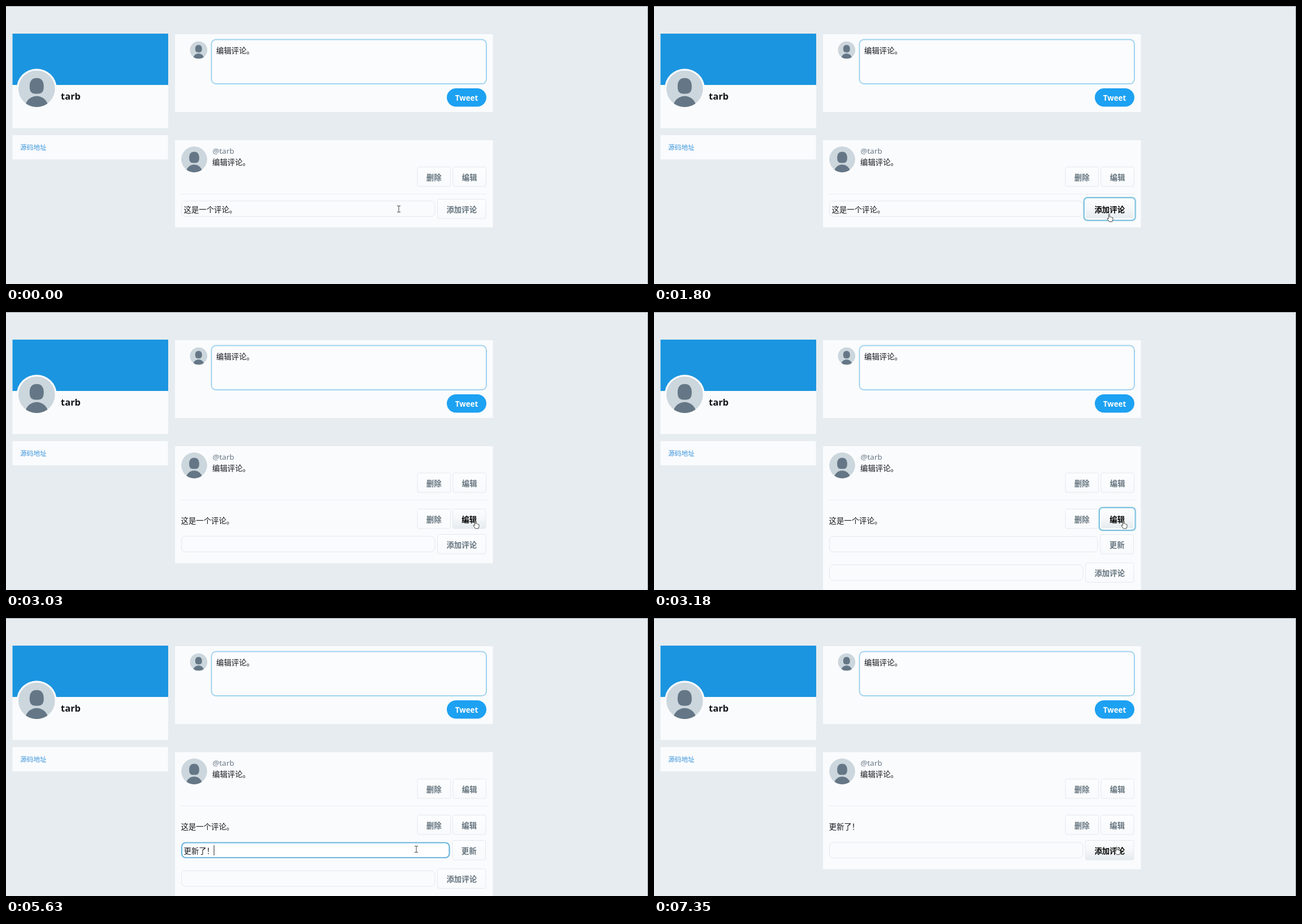
Recreate the animation shown at these times as an HTML page. Size 1136x493 px, loop 8 s.

```html
<!DOCTYPE html>
<html lang="zh-CN">
<head>
<meta charset="utf-8">
<title>评论</title>
<style>
html, body { margin: 0; width: 100%; height: 100%; overflow: hidden; background: #e6ecf0; }
svg { display: block; width: 100%; height: 100%; }
text { font: 13.4px "Noto Sans", "Noto Sans CJK SC", "Noto Sans CJK", sans-serif; fill: #14171a; white-space: pre; }
.zh { font-family: "Noto Sans CJK SC", "Noto Sans CJK", sans-serif; }
.bold { font-weight: 700; }
.mid { text-anchor: middle; }
.card { fill: #fafbfd; }
</style>
</head>
<body>
<svg viewBox="0 0 1136 493" preserveAspectRatio="none">
  <defs>
    <linearGradient id="plain" x2="0" y2="1"><stop stop-color="#fcfdfe"/><stop offset="1" stop-color="#f8fafb"/></linearGradient>
    <linearGradient id="hover" x2="0" y2="1"><stop stop-color="#fcfdfe"/><stop offset=".45" stop-color="#f6f8fa"/><stop offset="1" stop-color="#e5ebef"/></linearGradient>
    <clipPath id="disc"><circle r="32.5"/></clipPath>
    <g id="avatar" clip-path="url(#disc)">
      <circle r="32.5" fill="#ccd6dd"/>
      <path fill="#657786" d="M0-19C9-19 12.500-13 12.500-4C12.500 6 9 9 0 9S-12.500 6-12.500-4C-12.500-13-9-19 0-19ZM-21 33C-19 19-9 13 0 13S19 19 21 33Z"/>
    </g>
    <path id="arrow" d="M.5.5V10.500L2.800 8.400L4.500 12L6 11.300L4.400 7.800H7.500Z" fill="#fff" stroke="#333" stroke-width=".9"/>
    <path id="beam" d="M-3-5.500H-1L0-5L1-5.500H3M0-5V5M-3 5.500H-1L0 5L1 5.500H3" fill="none" stroke="#444"/>
    <path id="hand" d="M3.500 9V1.500Q4.400 0 5.300 1.500V6Q6.800 5 7.300 6.500Q8.700 5.700 9.200 7Q11 6.500 11 8V11L9.800 14.500H4.500L1 9.500Q.6 7.500 3.500 9Z" fill="#fff" stroke="#333" stroke-width=".9"/>
  </defs>

  <rect width="1136" height="493" fill="#e6ecf0"/>
  <path d="M0 .5H1135.500V493" fill="none" stroke="#9aa0a6"/>

  <rect class="card" x="11.500" y="49.500" width="275.500" height="167"/>
  <rect x="11.500" y="49" width="275.500" height="91" fill="#1b95e0"/>
  <circle cx="54.300" cy="146.700" r="35.500" class="card"/>
  <use href="#avatar" x="54.300" y="146.700"/>
  <text class="bold" x="97" y="166" style="font-size:16.500px">tarb</text>
  <rect class="card" x="11.500" y="229" width="275" height="43"/>
  <text class="zh" x="25" y="255" style="font-size:11.700px;fill:#3a95dc">源码地址</text>

  <rect class="card" x="299" y="50" width="562.500" height="138"/>
  <use href="#avatar" transform="translate(340.800 78) scale(.477)"/>
  <rect x="363.500" y="59.500" width="486.500" height="78.500" rx="8" fill="#fbfcfe" stroke="#a0d3ef" stroke-width="2"/>
  <text class="zh" x="372" y="84">编辑评论。</text>
  <rect x="780" y="146" width="70" height="32.500" rx="16.250" fill="#1da1f2"/>
  <text class="bold mid" x="815" y="168" style="fill:#fff">Tweet</text>

  <rect class="card" id="post" x="299" y="238" width="562.500"/>
  <use href="#avatar" transform="translate(333 272) scale(.708)"/>
  <text x="365.500" y="262" style="fill:#657786">@tarb</text>
  <text class="zh" x="365" y="281.500">编辑评论。</text>
  <path d="M310 333.500H851" stroke="#e8edf1"/>
  <g id="live"></g>
</svg>
<script>
const FIRST = '这是一个评论。', SECOND = '更新了！';
const HEIGHTS = [154.5, 207.5, 260, 207.5];
const live = document.getElementById('live'), post = document.getElementById('post');

// Each step lists only what changes from the state before it.
const steps = [
  [0, { phase: 0, text: FIRST, focus: '', glow: 1, hover: '', sel: 0, caret: 0, cur: ['beam', 695, 360] }],
  [560, { focus: 'addIn', sel: 1, glow: .4 }],
  [680, { glow: .75 }],
  [800, { glow: 1 }],
  [1260, { cur: ['arrow', 775.5, 378] }],
  [1380, { hover: 'add', cur: ['hand', 799, 371.5] }],
  [1530, { cur: ['hand', 800, 370] }],
  [1650, { cur: ['hand', 801, 368] }],
  [1800, { focus: 'add', sel: 0 }],
  [2200, { phase: 1, text: '', hover: 'edit' }],
  [2630, { cur: ['hand', 814, 369] }],
  [2750, { cur: ['hand', 826, 369.5] }],
  [3030, { focus: '' }],
  [3180, { phase: 2, focus: 'edit' }],
  [3460, { hover: 'update', cur: ['hand', 785.5, 411] }],
  [3610, { hover: '', cur: ['arrow', 745, 433] }],
  [3730, { cur: ['beam', 731, 450] }],
  [3880, { cur: ['beam', 729, 453] }],
  [4000, { cur: ['beam', 725, 450] }],
  [4120, { cur: ['beam', 723, 446.5] }],
  [4270, { cur: ['beam', 724, 408.5] }],
  [4420, { cur: ['beam', 724, 404] }],
  [4570, { cur: ['beam', 724, 403] }],
  [4690, { cur: ['beam', 724, 406] }],
  [4840, { focus: 'updateIn', caret: 1 }],
  [5350, { text: SECOND, caret: 0, cur: ['beam', 726, 410] }],
  [5630, { caret: 1 }],
  [5880, { sel: 1, caret: 0 }],
  [6400, { hover: 'update', cur: ['hand', 800, 406] }],
  [6520, { cur: ['hand', 813, 406] }],
  [6670, { cur: ['hand', 814, 405] }],
  [6950, { focus: 'update', sel: 0, glow: .6 }],
  [7070, { glow: 1 }],
  [7350, { phase: 3, text: '', focus: '', hover: 'add' }]
];
let last = {};
const states = steps.map(([at, change]) => last = { ...last, ...change, at });

const rect = (x, y, w, h, rx, fill, stroke = 'none', width = 1, extra = '') =>
  `<rect x="${x}" y="${y}" width="${w}" height="${h}" rx="${rx}" fill="${fill}" stroke="${stroke}" stroke-width="${width}" ${extra}/>`;
const label = (x, y, text, fill = '#14171a', cls = '') =>
  `<text class="zh ${cls}" x="${x}" y="${y}" style="fill:${fill}">${text}</text>`;

function button(s, id, text, x, y, w) {
  const on = s.focus === id, hot = s.hover === id;
  const ring = on ? `<g opacity="${s.glow}">` +
    rect(x - 3, y - 3, w + 6, 41, 6, '#fff', '#cfe8f4', 3) +
    rect(x - 2.5, y - 2.5, w + 5, 40, 6, '#fff', '#7cc1de', 2) + '</g>' : '';
  return ring + rect(x, y, w, 34.5, 3, `url(#${hot ? 'hover' : 'plain'})`, on ? '#fbfcfd' : '#e3e9ed') +
    label(x + w / 2, y + 23.3, text, hot ? '#000' : '#66757f', 'bold mid');
}

function field(s, id, y, w, text) {
  const on = s.focus === id, wide = 13.4 * text.length;
  let out = rect(310.5, y, w, 27.5, 7, on ? '#fff' : '#fafbfd', '#e3e8ec');
  if (on) out += rect(311, y + .5, w - 1, 26.5, 7, 'none', '#6cb7de', 2.2, `opacity="${s.glow}"`);
  const sel = on && s.sel;
  if (sel) out += rect(314.5, y + 4.8, wide, 18.2, 0, '#3390ff');
  out += label(314.5, y + 19.8, text, sel ? '#fff' : undefined);
  if (on && s.caret) out += rect(314.5 + wide - (text ? .5 : 0), y + 5, 1, 18, 0, '#222');
  return out;
}

function draw(s) {
  const { phase, text } = s;
  post.setAttribute('height', HEIGHTS[phase]);
  let out = button(s, 'topDelete', '删除', 728, 285.5, 58.5) + button(s, 'topEdit', '编辑', 791, 285.5, 58.5);
  if (phase) {
    out += label(309.5, 375, phase === 3 ? SECOND : FIRST) +
      button(s, 'delete', '删除', 728, 349.5, 58.5) + button(s, 'edit', '编辑', 790.5, 349.5, 58.5);
  }
  if (phase === 2) {
    out += field(s, 'updateIn', 398, 474.5, text) + button(s, 'update', '更新', 790, 394.5, 58.5);
  }
  const top = [342.5, 394.5, 445, 394.5][phase];
  out += field(s, 'addIn', top + 3.3, 448.5, phase ? '' : text) + button(s, 'add', '添加评论', 763.5, top, 85.5);
  const [kind, x, y] = s.cur;
  live.innerHTML = out + `<use href="#${kind}" x="${x}" y="${y}"/>`;
}

let shown;
function tick() {
  const t = performance.now() % 8000;
  const state = states.findLast(s => s.at <= t);
  if (state !== shown) draw(shown = state);
  requestAnimationFrame(tick);
}
tick();
</script>
</body>
</html>
```
